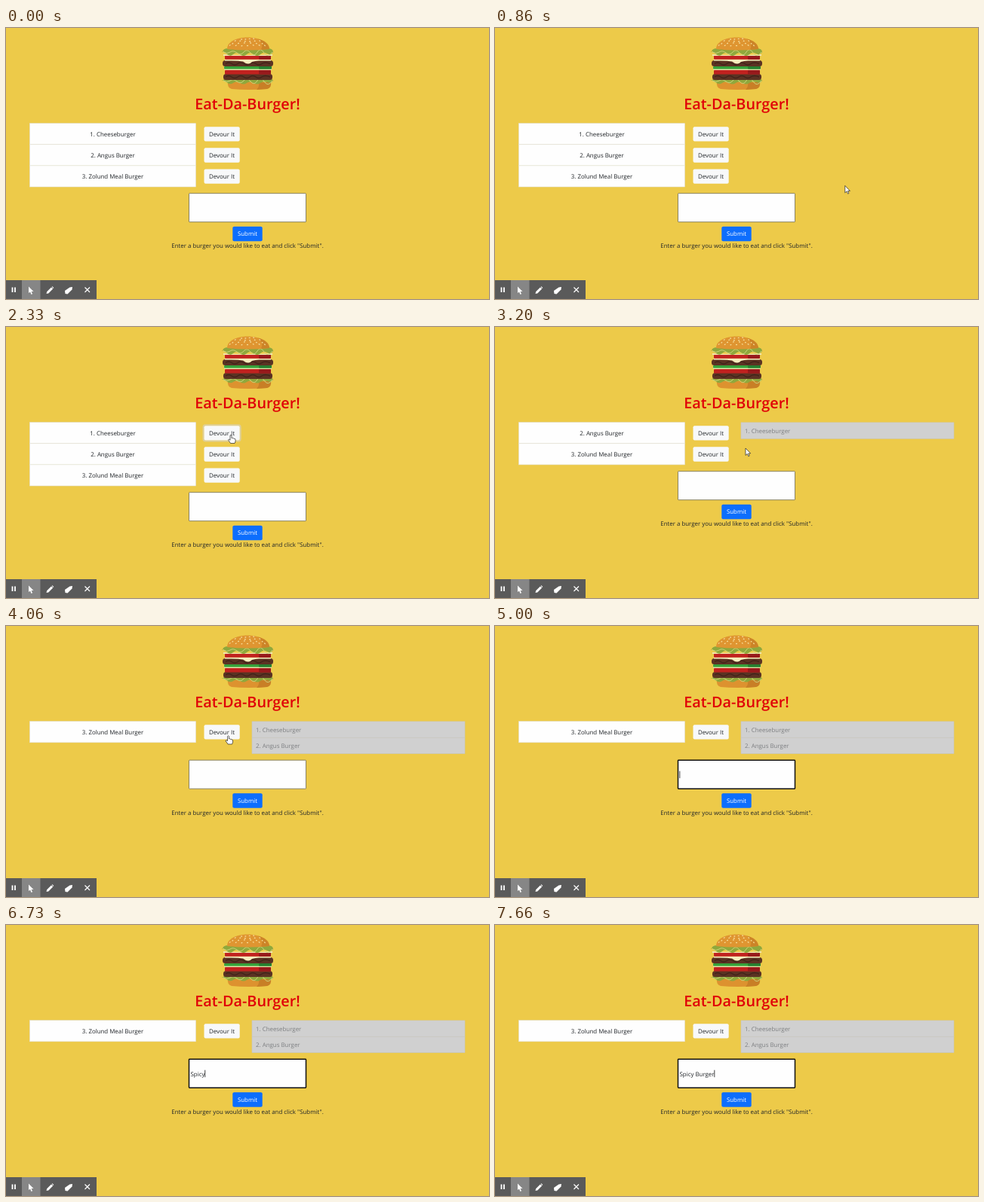
An HTML page for the animation above (8 s loop, 640 by 360 pixels).

```html
<!DOCTYPE html>
<html lang="en">
<head>
<meta charset="utf-8">
<title>Eat-Da-Burger!</title>
<style>
  html, body { margin: 0; width: 100%; height: 100%; overflow: hidden; background: #edca49; }
  svg { display: block; width: 100%; height: 100%; }
  text { font: 7.9px "Open Sans", "Noto Sans", sans-serif; fill: #212529; text-rendering: geometricPrecision; }
  .mid { text-anchor: middle; }
  .title { font-size: 19.8px; font-weight: 600; fill: #e00008; }
  .eaten text { fill: #7d7f81; }
</style>
</head>
<body>
<svg viewBox="0 0 640 360">
  <g id="burger">
    <path d="M294 72H351Q352 79 346 81Q320 83 299 81Q293 79 294 72Z" fill="#dd922f"/>
    <path d="M335 72H351Q352 79 346 81L332 82Q336 78 335 72Z" fill="#c87f26"/>
    <path d="M287 70q3-4 8-3H348q5 0 6 3q-3 4-8 2t-9 1t-9 0t-9 0t-9 0t-9 0t-9-1t-6-2Z" fill="#8fa83c"/>
    <path d="M288 70q5 3 9 0t9 1t9-1t9 1t9-1t9 1t11-1" fill="none" stroke="#c9d37a"/>
    <rect x="288" y="61" width="65" height="8" rx="3.5" fill="#5b3323"/>
    <path d="M291 65q4-3 8 0t8 0t8 0t8 0t8 0t8 0t11 0" fill="none" stroke="#42231a" stroke-width="1.5"/>
    <rect x="290" y="56" width="61" height="5.5" rx="1" fill="#c1221f"/>
    <rect x="335" y="56" width="16" height="5.5" rx="1" fill="#971a1c"/>
    <rect x="289" y="50" width="63" height="6" rx="1" fill="#e7dfa8"/>
    <rect x="289" y="51" width="63" height="3.6" rx="1" fill="#35a33a"/>
    <rect x="335" y="51" width="17" height="3.6" rx="1" fill="#25802f"/>
    <rect x="287" y="43" width="67" height="8" rx="3.5" fill="#5b3323"/>
    <path d="M291 47.5q4-3 8 0t8 0t8 0t8 0t8 0t8 0t11 0" fill="none" stroke="#42231a" stroke-width="1.5"/>
    <path d="M290 41.5H351V43.5H338Q331 43 326 45Q323 48 320.500 47.500Q317 47 314 44.500Q308 43 290 43.500Z" fill="#f6edbd"/>
    <rect x="290" y="36.500" width="61" height="5.200" rx="1" fill="#c1221f"/>
    <rect x="335" y="36.500" width="16" height="5.200" rx="1" fill="#971a1c"/>
    <path d="M288 35Q320 37 353 35V37H288Z" fill="#f0e6b0"/>
    <path d="M287 32q0-5 8-5H346q8 0 8 5q-3 5-8 2t-9 1t-9 0t-9 0t-9 0t-9 0t-9-1t-6-2Z" fill="#8fa83c"/>
    <path d="M288 32q5 3 9 0t9 1t9-1t9 1t9-1t9 1t11-1" fill="none" stroke="#c9d37a"/>
    <path d="M293 28C293 18 306 12.500 320 12.500S349 18 349 28Q320 31 293 28Z" fill="#df9531"/>
    <path d="M334 14.500Q348 18 349 28L338 29Q342 21 334 14.500Z" fill="#cc8427"/>
    <g id="seeds" fill="#f8e2a0"></g>
  </g>
  <text class="mid title" x="320" y="108">Eat-Da-Burger!</text>
  <g id="page"></g>
  <g id="form">
    <rect id="field" x="242.500" y="0" width="155" height="38" rx=".7" fill="#fefefe"/>
    <text id="typed" x="244.500" y="22.400" xml:space="preserve"></text>
    <path id="caret" d="M0 14.500V24" stroke="#111" stroke-width=".8"/>
    <rect x="300.300" y="44" width="39.400" height="19.500" rx="2" fill="#0d6efd"/>
    <text class="mid" x="320" y="56.600" style="fill:#fff">Submit</text>
    <text class="mid" x="320" y="72.600">Enter a burger you would like to eat and click "Submit".</text>
  </g>
  <g id="toolbar">
    <rect y="335" width="120" height="25" fill="#5a5a5a"/>
    <rect x="21" y="335" width="24.500" height="25" fill="#868686"/>
    <path d="M8.500 344.500V351M12 344.500V351" stroke="#fff" stroke-width="1.800"/>
    <path d="M30 343.500V352L32 350.500L33.500 354L35 353.200L33.600 350H36.500Z" fill="#fff"/>
    <path d="M53.500 353L54.200 350.200L60 344.500L62.200 346.600L56.300 352.400ZM60.600 343.800L61.400 343.200L63.300 345.100L62.700 346Z" fill="#fff"/>
    <path d="M78 349L84.500 344.500L88 344L87.500 347.500L81.500 353.500L78.500 353Z" fill="#fff"/>
    <path d="M104.500 344.500L111 351M111 344.500L104.500 351" stroke="#fff" stroke-width="1.200"/>
  </g>
  <path id="arrow" d="M0 0V9.500L2.200 7.500L3.800 10.800L5.200 10.100L3.700 7H6.700Z" fill="#fff" stroke="#222" stroke-width=".7"/>
  <path id="hand" d="M-1 1Q0-.5 1 1V4.500Q2.300 3.800 2.700 4.900Q4 4.300 4.400 5.500Q6 5.100 6 6.700V8.500Q5.800 10 5 11.500H-.5Q-1.500 9.500-3.300 7.600Q-3.600 6-2.200 6.300L-1 7.300Z" fill="#fff" stroke="#222" stroke-width=".7"/>
</svg>
<script>
const $ = id => document.getElementById(id);
const LOOP = 8000;
const burgers = ["1. Cheeseburger", "2. Angus Burger", "3. Zolund Meal Burger"];
const devoured = [2460, 3800];   // page reloads
const pressed = [2200, 3640];    // button gets its focus ring
const clickField = 5000;
const phrase = "Spicy Burger";
const keyTimes = [6130, 6330, 6460, 6600, 6730, 6860, 7060, 7200, 7330, 7400, 7530, 7660];
const track = [
  [730, 478, 215], [1480, 302, 146], [1590, 302, 146], [1800, 298, 143], [2790, 298, 143],
  [3200, 332, 161], [3560, 294.5, 145.5], [4070, 294.5, 145.5], [4400, 302, 192]
];
const formTops = [219.7, 191.7, 178.2];

// sesame seeds in rows that widen down the bun
for (const [y, n, half] of [[14.6, 4, 8], [17.4, 6, 16], [20.3, 6, 20], [23.2, 7, 23]])
  for (let i = 0; i < n; i++) {
    const x = 320 - half + 2 * half * i / (n - 1), dy = Math.sin(i * 5 + y) * .5;
    $("seeds").innerHTML += `<ellipse cx="${x}" cy="${y + dy}" rx="1.1" ry=".7" transform="rotate(${(x - 320) * 2} ${x} ${y})"/>`;
  }

const rect = (x, y, w, h, style) => `<rect x="${x}" y="${y}" width="${w}" height="${h}" ${style}/>`;
const label = (x, y, s, cls = "mid") => `<text class="${cls}" x="${x}" y="${y}">${s}</text>`;

function lists(eaten) {
  let out = "";
  burgers.slice(eaten).forEach((name, i) => {
    const y = 126.7 + 28.1 * i;
    out += rect(31.5, y, 220, 28.1, 'fill="#fefefe" stroke="#e2e0d6" stroke-width=".6"') + label(141.5, y + 17.1, name);
    if (!i) out += rect(261.5, y + 3.5, 49.2, 21.4, 'id="ring" rx="3" fill="none" stroke="#d3d4d5" stroke-opacity=".65" stroke-width="2"');
    out += rect(262.5, y + 4.5, 47.2, 19.4, 'rx="2" fill="#f8f9fa"') + label(286, y + 17.1, "Devour It");
  });
  out += '<g class="eaten">';
  burgers.slice(0, eaten).forEach((name, i) => {
    const y = 126.9 + 21.3 * i;
    out += rect(326, y, 282, 21.4, 'fill="#d0d0d0" stroke="#c6c6c2" stroke-width=".6"') + label(331, y + 13.7, name, "");
  });
  return out + "</g>";
}

function pointer(t) {
  const i = track.findIndex(k => k[0] > t);
  if (i < 1) return null;
  const [t0, x0, y0] = track[i - 1], [t1, x1, y1] = track[i];
  const p = (t - t0) / (t1 - t0), e = p * p * (3 - 2 * p);
  return [x0 + (x1 - x0) * e, y0 + (y1 - y0) * e];
}

let shown = -1;
function draw(t) {
  const eaten = devoured.filter(d => t >= d).length;
  if (eaten !== shown) {
    $("page").innerHTML = lists(eaten);
    shown = eaten;
  }
  const top = formTops[eaten];
  $("form").setAttribute("transform", `translate(0 ${top})`);
  const since = eaten < 2 ? t - pressed[eaten] : -1;
  $("ring").setAttribute("opacity", Math.max(0, Math.min(1, since / 150)));

  const focused = t >= clickField;
  $("field").setAttribute("stroke", focused ? "#101010" : "#6f6a52");
  $("field").setAttribute("stroke-width", focused ? 1.5 : .8);
  $("typed").textContent = phrase.slice(0, keyTimes.filter(k => t >= k).length);
  const caretOn = focused && (t < 5500 || t >= 6000);
  $("caret").setAttribute("visibility", caretOn ? "visible" : "hidden");
  $("caret").setAttribute("transform", `translate(${244.8 + $("typed").getComputedTextLength()} 0)`);

  const pos = pointer(t);
  let kind = "";
  if (pos) {
    const [x, y] = pos;
    const overField = x > 242 && x < 398 && y > top && y < top + 38;
    const overButton = x > 262 && x < 310 && y > 131 && y < 151;
    kind = overField ? "" : overButton ? "hand" : "arrow";
  }
  for (const id of ["arrow", "hand"]) {
    $(id).setAttribute("visibility", id === kind ? "visible" : "hidden");
    if (pos) $(id).setAttribute("transform", `translate(${pos})`);
  }
}

const start = performance.now();
function tick() {
  draw((performance.now() - start) % LOOP);
  requestAnimationFrame(tick);
}
tick();
</script>
</body>
</html>
```
